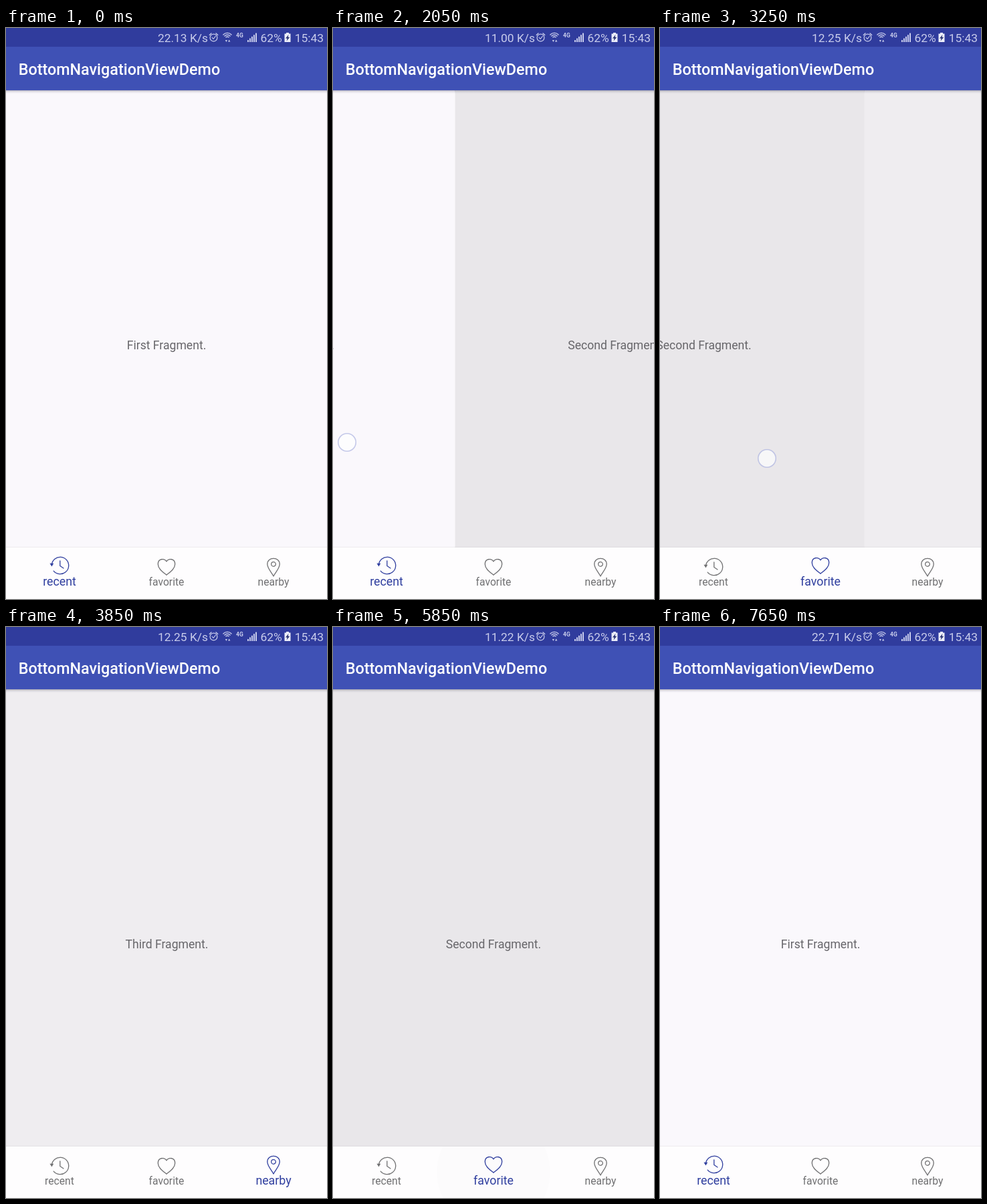
These frames come from a looping animation (480 by 853 pixels, 8000 ms). An HTML page with a canvas:

```html
<!DOCTYPE html>
<html lang="en">
<head>
<meta charset="utf-8">
<title>Bottom navigation demo</title>
<style>
  html, body { margin: 0; width: 100%; height: 100%; overflow: hidden; background: #faf8fc; }
  canvas { display: block; }
</style>
</head>
<body>
<canvas id="stage" width="480" height="853"></canvas>
<script>
const W = 480, H = 853, LOOP = 8000;
const BAR_BOTTOM = 93, NAV_TOP = 776;
const ACTIVE = [48, 63, 159], IDLE = [112, 112, 114];
const ctx = document.getElementById('stage').getContext('2d');

const pages = [
  { text: 'First Fragment.', color: '#faf8fc' },
  { text: 'Second Fragment.', color: '#e9e7ea' },
  { text: 'Third Fragment.', color: '#efedf0' }
];
const tabs = [
  { label: 'recent', x: 80, icon: drawClock },
  { label: 'favorite', x: 240, icon: drawHeart },
  { label: 'nearby', x: 400, icon: drawPin }
];

// [time, value]
const speeds = [[0, '22.13'], [950, '14.79'], [2000, '11.00'], [3050, '12.25'],
                [4070, '20.46'], [5100, '11.22'], [6130, '5.35'], [7150, '22.71']];
const selections = [[-1000, 0], [2055, 1], [3445, 2], [5660, 1], [6910, 0]];

// [time, scroll position]
const drags = [
  [[1390, 0], [1450, 15], [2050, 297.5], [2060, 303]],
  [[3040, 480], [3250, 654.5], [3440, 820]]
];
// settling after a release or a tap
const settles = [
  { at: 2060, from: 303, to: 480, time: 600 },
  { at: 3440, from: 820, to: 960, time: 600 },
  { at: 5660, from: 960, to: 480, time: 200 },
  { at: 6910, from: 480, to: 0, time: 200 }
];
// [time, x, y]
const touches = [
  [[1300, 346, 636], [1390, 324, 637], [1450, 288, 637], [2050, 21, 619], [2060, 16, 619]],
  [[2990, 372, 645], [3040, 334, 645], [3250, 160, 643], [3440, 12, 637]],
  [[5340, 247, 823], [5650, 247, 823]],
  [[6590, 105, 826], [6900, 105, 826]]
];
const ripples = [{ down: 5350, up: 5660, x: 240 }, { down: 6600, up: 6910, x: 80 }];

const clamp = v => Math.max(0, Math.min(1, v));
const mix = (a, b, k) => a + (b - a) * k;
const latest = (keys, t) => keys.filter(k => k[0] <= t).pop();
const quintOut = k => 1 + (k - 1) ** 5;

function sample(keys, t, column) {
  if (t <= keys[0][0]) return keys[0][column];
  for (let i = 1; i < keys.length; i++) {
    const a = keys[i - 1], b = keys[i];
    if (t <= b[0]) return mix(a[column], b[column], (t - a[0]) / (b[0] - a[0]));
  }
  return keys[keys.length - 1][column];
}

function scrollAt(t) {
  const drag = drags.find(d => t >= d[0][0] && t < d[d.length - 1][0]);
  if (drag) return sample(drag, t, 1);
  const s = settles.filter(s => s.at <= t).pop();
  return s ? mix(s.from, s.to, quintOut(clamp((t - s.at) / s.time))) : 0;
}

function activity(tab, t) {
  const i = selections.indexOf(latest(selections, t));
  const now = selections[i], before = selections[i - 1];
  const k = clamp((t - now[0]) / 45);
  if (now[1] === tab) return before ? k : 1;
  return before && before[1] === tab ? 1 - k : 0;
}

function text(str, x, y, size, color, align = 'left', weight = 400) {
  ctx.font = `${weight} ${size}px Roboto, sans-serif`;
  ctx.textAlign = align;
  ctx.fillStyle = color;
  ctx.fillText(str, x, y);
}

function stroke(build, width) {
  ctx.lineWidth = width;
  ctx.beginPath();
  build();
  ctx.stroke();
}

function fillPath(points) {
  ctx.beginPath();
  points.forEach(([x, y]) => ctx.lineTo(x, y));
  ctx.closePath();
  ctx.fill();
}

function line(...points) {
  points.forEach(([x, y], i) => i ? ctx.lineTo(x, y) : ctx.moveTo(x, y));
}

function drawClock() {
  stroke(() => ctx.arc(1, 0, 12.7, Math.PI * 1.03, Math.PI * 2.78), 1.3);
  stroke(() => line([0.8, -7], [0.8, 0.5], [6, 4]), 1.3);
  fillPath([[-14.5, -3.2], [-8.7, -3.2], [-11.6, 1.6]]);
}

function drawHeart() {
  stroke(() => {
    ctx.moveTo(0, -8);
    ctx.bezierCurveTo(-3, -13, -12.7, -13, -12.7, -4);
    ctx.bezierCurveTo(-12.7, 3, -5, 8, 0, 12.2);
    ctx.bezierCurveTo(5, 8, 12.7, 3, 12.7, -4);
    ctx.bezierCurveTo(12.7, -13, 3, -13, 0, -8);
    ctx.closePath();
  }, 1.3);
}

function drawPin() {
  stroke(() => {
    ctx.moveTo(0, 14);
    ctx.bezierCurveTo(-3, 8, -9.2, 2, -9.2, -4);
    ctx.bezierCurveTo(-9.2, -15.6, 9.2, -15.6, 9.2, -4);
    ctx.bezierCurveTo(9.2, 2, 3, 8, 0, 14);
    ctx.closePath();
  }, 1.3);
  stroke(() => ctx.arc(0, -4, 3.3, 0, Math.PI * 2), 1.3);
}

function drawPages(t) {
  const scroll = scrollAt(t);
  pages.forEach((page, i) => {
    const x = i * W - scroll;
    if (x <= -W || x >= W) return;
    ctx.fillStyle = page.color;
    ctx.fillRect(x, BAR_BOTTOM, W, NAV_TOP - BAR_BOTTOM);
    text(page.text, x + W / 2, 480, 17.6, '#67666a', 'center');
  });
}

function drawStatusIcons() {
  const ink = '#c9cdec';
  ctx.strokeStyle = ctx.fillStyle = ink;

  // alarm
  stroke(() => ctx.arc(310.5, 14.5, 5.4, 0, Math.PI * 2), 1.2);
  stroke(() => line([308, 14], [310, 16.5], [313.3, 12.3]), 1.1);
  stroke(() => { line([304.3, 10.5], [307, 8]); line([314, 8], [316.7, 10.5]); }, 1.4);

  // wifi and transfer arrows
  [3, 5.8, 8.6].forEach(r =>
    stroke(() => ctx.arc(331, 16, r, Math.PI * 1.25, Math.PI * 1.75), 1.4));
  fillPath([[327.8, 18], [331, 18], [329.4, 21]]);
  fillPath([[332, 20.5], [335.4, 20.5], [333.7, 17.5]]);

  text('4G', 344, 14.3, 8.5, ink, 'left', 700);

  // signal
  for (let i = 0; i < 5; i++) {
    const h = 3 + i * 2.6;
    ctx.fillRect(361 + i * 3, 21 - h, 2, h);
  }

  // battery
  ctx.fillStyle = '#eceefa';
  ctx.fillRect(419, 7, 4, 2);
  ctx.fillRect(416.5, 8.5, 9, 12.5);
  ctx.fillStyle = '#27306f';
  fillPath([[422.5, 10], [418, 15.5], [420.6, 15.5], [419.6, 19.5], [424.2, 13.8], [421.6, 13.8]]);
}

function drawBars(t) {
  const shade = ctx.createLinearGradient(0, BAR_BOTTOM, 0, BAR_BOTTOM + 5);
  shade.addColorStop(0, 'rgba(20,20,50,.32)');
  shade.addColorStop(0.4, 'rgba(20,20,50,.1)');
  shade.addColorStop(1, 'rgba(20,20,50,0)');
  ctx.fillStyle = shade;
  ctx.fillRect(0, BAR_BOTTOM, W, 5);
  ctx.fillStyle = '#3f51b5';
  ctx.fillRect(0, 28, W, BAR_BOTTOM - 28);
  ctx.fillStyle = '#303c9d';
  ctx.fillRect(0, 0, W, 28);

  text('BottomNavigationViewDemo', 18.7, 70, 23.33, '#fff', 'left', 500);
  text(latest(speeds, t)[1] + ' K/s', 302, 21, 17.4, '#c9cdec', 'right');
  text('62%', 380.5, 21, 17.4, '#c9cdec');
  text('15:43', 475, 21, 17.4, '#c9cdec', 'right');
  drawStatusIcons();
}

function drawRipple({ down, up, x }, t) {
  if (t < down || t > up + 400) return;
  const grow = clamp((t - down) / 200);
  ctx.save();
  ctx.beginPath();
  ctx.rect(0, NAV_TOP, W, H - NAV_TOP);
  ctx.clip();
  ctx.fillStyle = `rgba(0,0,0,${0.018 * (1 - clamp((t - up) / 400))})`;
  ctx.beginPath();
  ctx.arc(x, 814, 85 * Math.sqrt(grow), 0, Math.PI * 2);
  ctx.fill();
  ctx.restore();
}

function drawNav(t) {
  ctx.fillStyle = 'rgba(0,0,0,.05)';
  ctx.fillRect(0, NAV_TOP - 1, W, 1);
  ctx.fillStyle = '#fefdfe';
  ctx.fillRect(0, NAV_TOP, W, H - NAV_TOP);
  ripples.forEach(r => drawRipple(r, t));

  tabs.forEach((tab, i) => {
    const k = activity(i, t);
    const color = `rgb(${IDLE.map((v, c) => Math.round(mix(v, ACTIVE[c], k)))})`;
    text(tab.label, tab.x, 833, mix(15.7, 17.8, k), color, 'center');
    ctx.save();
    ctx.translate(tab.x, mix(805, 803, k));
    ctx.strokeStyle = ctx.fillStyle = color;
    tab.icon();
    ctx.restore();
  });
}

function drawTouch(keys, t) {
  const start = keys[0][0], end = keys[keys.length - 1][0];
  const alpha = Math.min(clamp((t - start) / 40), 1 - clamp((t - end) / 80));
  if (alpha <= 0) return;
  ctx.save();
  ctx.globalAlpha = alpha;
  ctx.beginPath();
  ctx.arc(sample(keys, t, 1), sample(keys, t, 2), 13.2, 0, Math.PI * 2);
  ctx.fillStyle = 'rgba(255,255,255,.65)';
  ctx.fill();
  ctx.lineWidth = 1.6;
  ctx.strokeStyle = 'rgba(160,168,220,.6)';
  ctx.stroke();
  ctx.restore();
}

function render(now) {
  const t = now % LOOP;
  ctx.lineJoin = ctx.lineCap = 'round';
  drawPages(t);
  drawBars(t);
  drawNav(t);
  touches.forEach(keys => drawTouch(keys, t));
}

let startTime;
function tick(now) {
  startTime ??= now;
  render(now - startTime);
  requestAnimationFrame(tick);
}
render(0);
requestAnimationFrame(tick);
</script>
</body>
</html>
```
